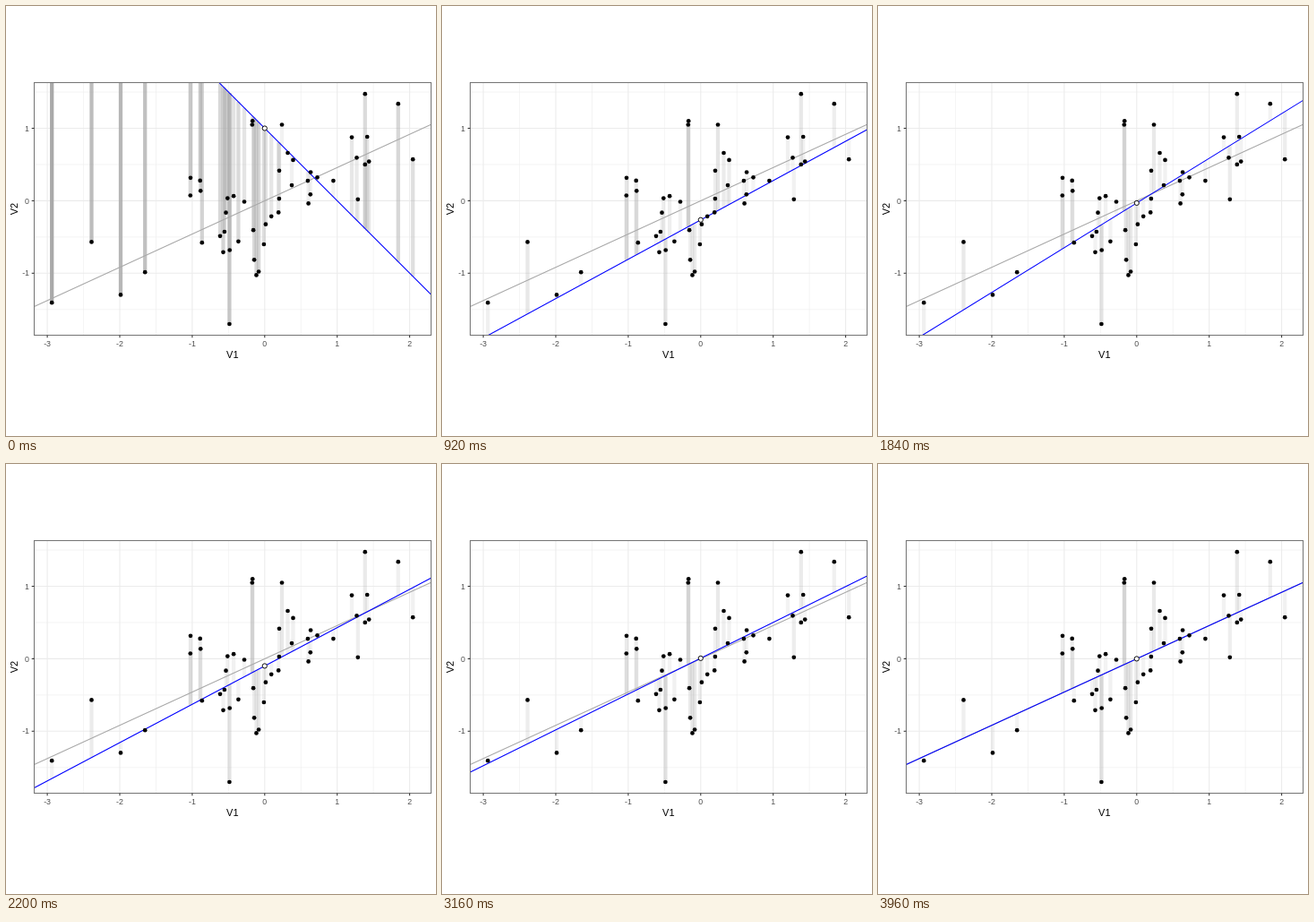
Recreate the animation shown at these times as an HTML page. Size 480 by 480 pixels, loop 4 s.

```html
<!DOCTYPE html>
<html lang="en">
<head>
<meta charset="utf-8">
<title>Least squares with springs</title>
<style>
html, body { margin: 0; width: 100%; height: 100%; overflow: hidden; background: #fff; }
svg { display: block; width: 100%; height: 100%; }
text { font-family: "Liberation Sans", Arial, sans-serif; }
.tick { font-size: 8.8px; fill: #4d4d4d; }
.title { font-size: 11px; fill: #000; text-anchor: middle; }
</style>
</head>
<body>
<svg id="stage" viewBox="0 0 480 480">
  <defs><clipPath id="panel"><rect x="31" y="85" width="444" height="283"/></clipPath></defs>
  <g id="grid" stroke="#ebebeb"></g>
  <g clip-path="url(#panel)">
    <g id="bars" stroke="#a9a9a9" stroke-width="4.27"></g>
    <line id="best" stroke="#a9a9a9" stroke-width="1.07"/>
    <line id="fit" stroke="#00f" stroke-width="1.07"/>
    <g id="dots"></g>
    <circle id="pivot" r="2.6" fill="#fff" stroke="#000" stroke-width="0.95"/>
  </g>
  <rect x="31.5" y="85.5" width="443" height="282" fill="none" stroke="#777" stroke-width="1.07"/>
  <g id="axes"></g>
  <text class="title" x="252.8" y="393">V1</text>
  <text class="title" transform="translate(13 226.5) rotate(-90)">V2</text>
</svg>
<script>
const LEFT = 31.5, RIGHT = 474.5, TOP = 85.5, BOTTOM = 367.5;
const X0 = 288.8, Y0 = 217.4, UNIT = 80.9;
const STEPS = 100, STEP_MS = 40;
const BEST_SLOPE = 0.459;

// Stage positions of the observations
const points = [
  [51.2, 331.2], [95.5, 263.4], [128, 322.4], [155.2, 297.2], [206, 191.8],
  [205.8, 211.5], [216.7, 194.9], [217.2, 206.3], [218.8, 264.2], [239, 256.8],
  [242.5, 274.8], [243.9, 252], [245.5, 230.7], [247.3, 214.6], [249.4, 355],
  [249.7, 272.5], [254.1, 212.2], [259.4, 262.8], [266, 218.5], [275.2, 128.3],
  [274.8, 132.5], [276.1, 250.2], [277.1, 283.3], [279.5, 300.4], [282.1, 296.5],
  [287.9, 266], [289.9, 243.7], [296.2, 234.8], [304.2, 230.4], [304.9, 215.1],
  [305, 183.8], [308, 132.5], [314.5, 164], [319, 200.1], [320.5, 171.9],
  [336.9, 195.1], [337.6, 220.4], [339.8, 210.3], [340.1, 185.5], [347.5, 191.3],
  [365.4, 195.1], [386, 146.6], [391.5, 169.3], [392.8, 215.8], [400.8, 98.2],
  [400.8, 176.9], [403.2, 146], [405.2, 173.6], [437.8, 109.2], [454.2, 171.2]
];

const $ = id => document.getElementById(id);
const px = x => X0 + UNIT * x;
const py = y => Y0 - UNIT * y;

function set(el, attrs) {
  for (const k in attrs) el.setAttribute(k, attrs[k]);
  return el;
}
function add(parent, tag, attrs) {
  return parent.appendChild(set(document.createElementNS("http://www.w3.org/2000/svg", tag), attrs));
}
const line = (parent, x1, y1, x2, y2, width) =>
  add(parent, "line", { x1, y1, x2, y2, "stroke-width": width });

// A damped rigid line: the height and the angle are driven by the residuals
function simulate() {
  const drag = 0.92, lift = 0.0321, turn = 0.0289;
  let a = 1, va = 0, angle = -Math.PI / 4, vAngle = 0;
  const list = [];
  for (let i = 0; i < STEPS - 1; i++) {
    list.push({ a, b: Math.tan(angle) });
    va = drag * va - lift * a;
    vAngle = drag * vAngle - turn * (Math.tan(angle) - BEST_SLOPE);
    a += va;
    angle += vAngle;
  }
  list.push({ a: 0, b: BEST_SLOPE });
  return list;
}

const lineY = (s, x) => py(s.a) - s.b * (x - X0);
const residual = (s, p) => Math.abs(p[1] - lineY(s, p[0]));
const setLine = (el, s) =>
  set(el, { x1: LEFT, y1: lineY(s, LEFT), x2: RIGHT, y2: lineY(s, RIGHT) });

function drawAxes() {
  const grid = $("grid"), axes = $("axes");
  for (let v = -2.5; v < 2; v++) line(grid, px(v), TOP, px(v), BOTTOM, 0.53);
  for (let v = -1.5; v < 2; v++) line(grid, LEFT, py(v), RIGHT, py(v), 0.53);
  for (let v = -3; v <= 2; v++) {
    line(grid, px(v), TOP, px(v), BOTTOM, 1.07);
    line(axes, px(v), BOTTOM, px(v), BOTTOM + 2.8, 1.07).setAttribute("stroke", "#333");
    add(axes, "text", { class: "tick", x: px(v), y: 380, "text-anchor": "middle" }).textContent = v;
  }
  for (let v = -1; v <= 1; v++) {
    line(grid, LEFT, py(v), RIGHT, py(v), 1.07);
    line(axes, LEFT - 2.8, py(v), LEFT, py(v), 1.07).setAttribute("stroke", "#333");
    add(axes, "text", { class: "tick", x: 26, y: py(v) + 3.1, "text-anchor": "end" }).textContent = v;
  }
}

const states = simulate();
const longest = Math.max(...points.map(p => residual(states[0], p)));

drawAxes();
setLine($("best"), { a: 0, b: BEST_SLOPE });
const bars = points.map(([x, y]) => add($("bars"), "line", { x1: x, x2: x, y1: y }));
points.forEach(([cx, cy]) => add($("dots"), "circle", { cx, cy, r: 2.35 }));

function render(ms) {
  const s = states[Math.floor(ms / STEP_MS) % STEPS];
  setLine($("fit"), s);
  set($("pivot"), { cx: X0, cy: py(s.a) });
  points.forEach((p, i) => set(bars[i], {
    y2: lineY(s, p[0]),
    "stroke-opacity": 0.1 + 0.9 * residual(s, p) / longest
  }));
}

let start;
function tick(now) {
  if (start === undefined) start = now;
  render(Math.max(0, now - start));
  requestAnimationFrame(tick);
}
render(0);
requestAnimationFrame(tick);
</script>
</body>
</html>
```
